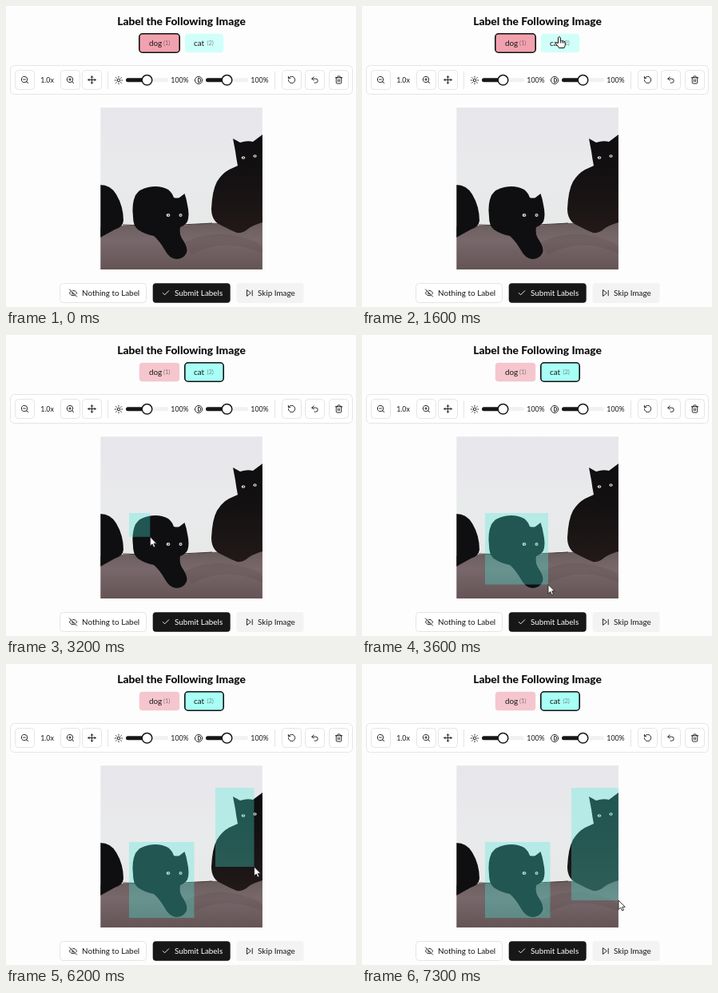
An HTML page for the animation above (8 s loop, 438x377 px).

```html
<!DOCTYPE html>
<html lang="en">
<head>
<meta charset="utf-8">
<title>Image labelling</title>
<style>
  html, body { margin: 0; width: 100%; height: 100%; overflow: hidden; background: #fdfdfd; }
  svg { display: block; width: 100%; height: 100%; }
  text { font: 9.9px Lato, sans-serif; fill: #171717; }
  .title { font-size: 13.8px; font-weight: 800; fill: #0a0a0a; }
  .key { font-size: 7.5px; fill: #222; opacity: .5; }
  .value { font-size: 8.8px; }
  .box { fill: #fff; stroke: #e5e5e5; }
  .line { stroke: #e5e5e5; }
  .icon { fill: none; stroke: #171717; stroke-width: 2; stroke-linecap: round; stroke-linejoin: round; }
  .label { fill: #48ebda; opacity: .32; }
</style>
</head>
<body>
<svg viewBox="0 0 438 377">
  <defs>
    <linearGradient id="wall" x2="0" y2="1">
      <stop stop-color="#e7e6eb"/><stop offset=".4" stop-color="#e9eaec"/><stop offset=".75" stop-color="#e7e9e8"/>
    </linearGradient>
    <linearGradient id="sofa" x2="0" y2="1">
      <stop stop-color="#685a5b"/><stop offset=".4" stop-color="#78686b"/><stop offset="1" stop-color="#645456"/>
    </linearGradient>
    <linearGradient id="fur" x2="0" y2="1">
      <stop stop-color="#0e0d0f"/><stop offset=".45" stop-color="#141112"/><stop offset="1" stop-color="#221918"/>
    </linearGradient>
    <clipPath id="photo"><rect x="118.300" y="127.300" width="202.600" height="202.800"/></clipPath>
  </defs>

  <text class="title" x="219.5" y="24" text-anchor="middle">Label the Following Image</text>

  <rect id="dog" x="166.8" y="34.8" width="50.4" height="23.4" rx="4" stroke-width="1.6"/>
  <text x="179" y="50">dog</text><text class="key" x="197" y="49">(1)</text>
  <rect id="cat" x="223.8" y="34.8" width="48.4" height="23.4" rx="4" stroke-width="1.6"/>
  <text x="235" y="50">cat</text><text class="key" x="251.5" y="49">(2)</text>

  <rect class="box" x="5.5" y="74.5" width="428" height="36" rx="5"/>
  <path class="line" d="M127.5 82v22M336.5 82v22"/>
  <text class="value" x="51.5" y="96.3" text-anchor="middle">1.0x</text>
  <g id="tools"></g>

  <g clip-path="url(#photo)">
    <rect x="118" y="127" width="203" height="203" fill="url(#wall)"/>
    <path fill="url(#sofa)" d="M118 277Q145 274 165 275Q215 276 240 273Q270 270 290 274L321 268V330H118z"/>
    <path d="M224 296Q255 281 288 288T321 304V310Q275 288 232 312z" fill="#4f4244" opacity=".2"/>
    <path d="M146 274Q185 276 258 272" fill="none" stroke="#463b3b" stroke-width="1.2"/>
    <path fill="#0f0f11" d="M118 224Q131 224 138 236Q147 251 147 269Q146 277 136 280L118 290z"/>
    <path fill="url(#fur)" d="M284 166L293 171Q302 168 309 170L321 161V271Q308 275 303 279Q297 285 289 284Q279 280 270 275Q257 270 257 254Q258 231 264 220Q270 210 279 205L290 200Q288 190 287 182z"/>
    <path fill="#0f0f11" d="M159 264Q157 248 162 237Q167 229 178 227Q192 224 203 230Q208 234 210 240Q214 241 217 240L223.500 235Q226 242 227 249Q230 262 227 270Q224 275 218 277Q216 286 222 294Q228 303 226 309Q222 317 213 317Q204 316 199 306Q192 294 185 288Q174 286 165 280Q159 275 159 264z"/>
    <g fill="#d5d8cc">
      <ellipse cx="203" cy="262" rx="2.4" ry="2"/><ellipse cx="218.500" cy="262" rx="2" ry="2"/>
      <ellipse cx="297" cy="190" rx="2.4" ry="1.7"/><ellipse cx="311.500" cy="188" rx="2.2" ry="1.7"/>
    </g>
    <g fill="#181818">
      <circle cx="203.300" cy="262" r=".8"/><circle cx="218.500" cy="262" r=".8"/>
      <circle cx="297.300" cy="190" r=".8"/><circle cx="311.500" cy="188" r=".8"/>
    </g>
  </g>

  <rect class="label" id="first"/>
  <rect class="label" id="second"/>

  <rect class="box" x="67.5" y="347.500" width="108" height="24" rx="4"/>
  <text x="95" y="363">Nothing to Label</text>
  <rect x="183.700" y="347.200" width="97" height="24.500" rx="4" fill="#171717"/>
  <text x="211" y="363" style="fill:#fff">Submit Labels</text>
  <rect x="288.500" y="347" width="84" height="25" rx="4" fill="#f3f3f4"/>
  <text x="315" y="363">Skip Image</text>
  <g id="icons"></g>

  <g id="cursor" stroke-linejoin="round">
    <path id="arrow" fill="#fff" stroke="#222" stroke-width=".9" d="M0 0V11.500L2.700 9L4.500 13L6.400 12.200L4.700 8.300H8.200z"/>
    <path id="hand" fill="#fff" stroke="#111" d="M-1.500 8V1Q0-1 1.300 1V5Q2.500 4 3.700 5.300Q5 4.500 5.700 6Q7.200 5.500 7.300 7V10Q7 12 6 14H-.5Q-1.500 11.500-4.700 8.700Q-4.500 6.500-1.500 8zM1.300 5V8M3.700 5.500V8M5.700 6V8"/>
  </g>
</svg>
<script>
const $ = id => document.getElementById(id);
const setAttrs = (el, attrs) => { for (const k in attrs) el.setAttribute(k, attrs[k]); };

const circle = (x, y, r) => `M${x - r} ${y}a${r} ${r} 0 1 0 ${2 * r} 0a${r} ${r} 0 1 0 ${-2 * r} 0`;
const zoomOut = circle(11, 11, 8) + 'M21 21l-4.350-4.350M8 11h6';
const rays = Array.from({ length: 8 }, (_, i) => {
  const c = Math.cos(i * Math.PI / 4), s = Math.sin(i * Math.PI / 4);
  return `M${12 + 8 * c} ${12 + 8 * s}L${12 + 10.5 * c} ${12 + 10.5 * s}`;
}).join('');

const icon = (x, y, d, style = '') =>
  `<path class="icon" style="${style}" transform="translate(${x} ${y}) scale(.46) translate(-12 -12)" d="${d}"/>`;

const toolButton = ([x, d]) =>
  `<rect class="box" x="${x - 12}" y="80.5" width="24" height="24" rx="4"/>` + icon(x, 92.5, d);

const slider = x => `
  <rect x="${x}" y="90.3" width="53" height="5" rx="2.5" fill="#f1f1f2"/>
  <rect x="${x}" y="90.3" width="27" height="5" rx="2.5" fill="#171717"/>
  <circle cx="${x + 26.5}" cy="92.800" r="6.300" fill="#fff" stroke="#171717" stroke-width="1.5"/>
  <text class="value" x="${x + 67.500}" y="96.300" text-anchor="middle">100%</text>`;

$('tools').innerHTML = [
  [23.5, zoomOut],
  [80.5, zoomOut + 'M11 8v6'],
  [107.5, 'M12 2v20M2 12h20M15 19l-3 3-3-3M19 9l3 3-3 3M5 9l-3 3 3 3M9 5l3-3 3 3'],
  [357.5, 'M3 12a9 9 0 1 0 9-9 9.750 9.750 0 0 0-6.740 2.740L3 8M3 3v5h5'],
  [386.5, 'M9 14L4 9l5-5M4 9h10.500a5.500 5.500 0 0 1 0 11H11'],
  [416.5, 'M3 6h18M19 6v14c0 1-1 2-2 2H7c-1 0-2-1-2-2V6M8 6V4c0-1 1-2 2-2h4c1 0 2 1 2 2v2M10 11v6M14 11v6'],
].map(toolButton).join('') + slider(150) + slider(250) +
  icon(141, 93, circle(12, 12, 4) + rays) +
  icon(241, 93, circle(12, 12, 10) + 'M12 18a6 6 0 0 0 0-12z');

$('icons').innerHTML =
  icon(84, 359.5, 'M9.880 9.880a3 3 0 1 0 4.240 4.240M10.730 5.080A10.430 10.430 0 0 1 12 5c7 0 10 7 10 7a13.160 13.160 0 0 1-1.670 2.680M6.610 6.610A13.530 13.530 0 0 0 2 12s3 7 10 7a9.740 9.740 0 0 0 5.390-1.610M2 2l20 20') +
  icon(200, 359.5, 'M20 6L9 17l-5-5', 'stroke:#fff') +
  icon(305, 359.5, 'M5 4l10 8-10 8zM19 5v14');

const LOOP = 8000, STEP = 100;
const SHOW = 600, SELECT = 1900, DRAG_1 = 3000, DRAG_2 = 5600;

// Cursor tip: time, x, y
const path = [
  [600, 290, 215], [1400, 248, 40], [1600, 247, 38.5], [2300, 240.5, 45], [2600, 240.5, 45],
  [3000, 154, 223], [3600, 233, 312.5], [3800, 235.5, 318], [5100, 235.5, 318],
  [5200, 259, 181], [5300, 262, 155], [5600, 262, 155],
  [6200, 310.5, 254], [6500, 319, 284], [6900, 321, 296], [8000, 321, 296],
];

function cursorAt(t) {
  const i = Math.max(1, path.findIndex(p => p[0] >= t));
  const [t0, x0, y0] = path[i - 1], [t1, x1, y1] = path[i];
  const k = Math.max(0, (t - t0) / (t1 - t0));
  return [x0 + (x1 - x0) * k, y0 + (y1 - y0) * k];
}

function drawLabel(id, t, start, end) {
  const [x, y] = cursorAt(start), [right, bottom] = cursorAt(Math.max(start, Math.min(t, end)));
  setAttrs($(id), { x, y, width: right - x, height: bottom - y });
}

function render(t) {
  const [x, y] = cursorAt(t);
  const catSelected = t >= SELECT;
  const overButton = x > 223 && x < 273 && y > 32 && y < 59;
  setAttrs($('dog'), { fill: catSelected ? '#f5c6ce' : '#f1a2ae', stroke: catSelected ? 'none' : '#111' });
  setAttrs($('cat'), { fill: catSelected ? '#a8fff5' : '#d0fffa', stroke: catSelected ? '#111' : 'none' });
  drawLabel('first', t, DRAG_1, 3800);
  drawLabel('second', t, DRAG_2, 6900);
  setAttrs($('cursor'), { transform: `translate(${x} ${y})`, visibility: t < SHOW ? 'hidden' : 'visible' });
  setAttrs($('arrow'), { display: overButton ? 'none' : 'inline' });
  setAttrs($('hand'), { display: overButton ? 'inline' : 'none' });
}

const began = performance.now();
function tick() {
  const elapsed = (performance.now() - began) % LOOP;
  render(Math.floor(elapsed / STEP) * STEP);
  requestAnimationFrame(tick);
}
tick();
</script>
</body>
</html>
```
